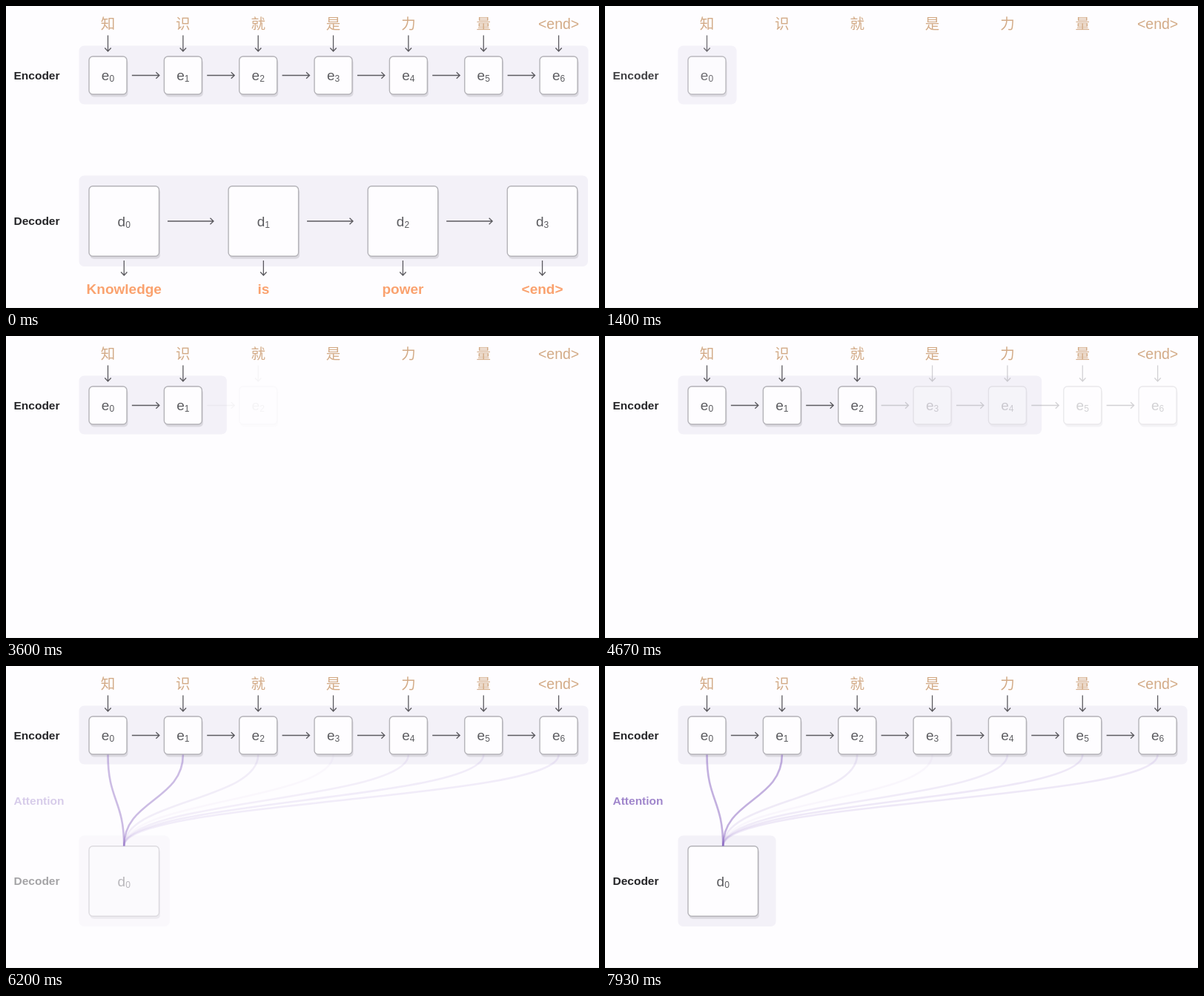
Recreate the animation shown at these times as an HTML page. Size 800 px wide and 407 px high, loop 8 s.

```html
<!DOCTYPE html>
<html lang="zh-CN">
<head>
<meta charset="utf-8">
<title>Encoder and decoder</title>
<style>
html, body { margin: 0; height: 100%; overflow: hidden; background: #fefdff; }
svg { display: block; width: 800px; height: 407px; }
text { font-family: "Liberation Sans", Arial, sans-serif; }
.input { font: 19.5px "Liberation Sans", "Noto Sans CJK SC", "Noto Sans CJK", sans-serif; fill: #d3ab87; text-anchor: middle; }
.output { font-size: 19px; font-weight: bold; fill: #faa26f; text-anchor: middle; }
.label { font-size: 15.5px; font-weight: bold; fill: #242427; }
.name { font-size: 19px; fill: #5c5c60; text-anchor: middle; }
.sub { font-size: 12px; }
.panel { fill: #f3f1f8; }
.shadow { fill: #dbd9e0; }
.box { fill: #fefdff; stroke: #b4b3b8; stroke-width: 1.4; }
.arrow { fill: none; stroke: #5c5b60; stroke-width: 1.3; }
.link { fill: none; stroke: #7b52b9; stroke-width: 2.6; }
</style>
</head>
<body>
<svg viewBox="0 0 800 407"></svg>
<script>
const svg = document.querySelector('svg');
const LOOP = 8000, STEP = 1000 / 15;
const INPUTS = ['知', '识', '就', '是', '力', '量', '<end>'];
const OUTPUTS = ['Knowledge', 'is', 'power', '<end>'];
const WEIGHTS = [.45, .45, .11, .04, .1, .12, .12];
const LEFT = 98.5;
const encX = i => 137.5 + 101.35 * i;
const decX = i => 159.25 + 188.1 * i;

function add(parent, tag, attrs, content = '') {
  const el = document.createElementNS('http://www.w3.org/2000/svg', tag);
  for (const key in attrs) el.setAttribute(key, attrs[key]);
  el.textContent = content;
  return parent.appendChild(el);
}
const group = () => add(svg, 'g', {});
const text = (parent, cls, x, y, content) => add(parent, 'text', { class: cls, x, y }, content);
const panel = (y, height) => add(svg, 'rect', { class: 'panel', x: LEFT, y, height, rx: 7 });

function label(y, content, fill) {
  const el = text(group(), 'label', 10.5, y, content);
  if (fill) el.style.fill = fill;
  return el;
}

function rightArrow(parent, x, y, length) {
  add(parent, 'path', { class: 'arrow', d: `M${x} ${y}h${length}m-4.5 -4.2l4.5 4.2l-4.5 4.2` });
}

function downArrow(parent, x, y, length) {
  add(parent, 'path', { class: 'arrow', d: `M${x} ${y}v${length}m-4.2 -4.5l4.2 4.5l4.2 -4.5` });
}

function cell(parent, x, y, size, letter, index) {
  const rect = { x: x - size / 2, y: y - size / 2, width: size, height: size, rx: 5 };
  add(parent, 'rect', { ...rect, class: 'shadow', x: rect.x + 1.5, y: rect.y + 3.5 });
  add(parent, 'rect', { ...rect, class: 'box' });
  const name = text(parent, 'name', x, y + 6.7, letter);
  add(name, 'tspan', { class: 'sub', dy: 1.8 }, index);
}

add(svg, 'rect', { y: 406, width: 800, height: 1, fill: '#f5f4f6' });
INPUTS.forEach((word, i) => text(svg, 'input', encX(i), i < 6 ? 31 : 30.5, word));

const encPanel = panel(53.5, 79), decPanel = panel(228.5, 122.5);
const encLabel = label(98.7, 'Encoder');
const decLabel = label(295.4, 'Decoder');
const attLabel = label(186.7, 'Attention', '#a086cc');

const encCells = INPUTS.map((_, i) => {
  const g = group(), x = encX(i);
  downArrow(g, x, 39.5, 21.5);
  if (i) rightArrow(g, x - 69, 93.5, 37);
  cell(g, x, 93.5, 51, 'e', i);
  return g;
});

const decCells = OUTPUTS.map((_, i) => {
  const g = group(), x = decX(i);
  if (i) rightArrow(g, x - 129.4, 290, 62);
  cell(g, x, 290, 94.5, 'd', i);
  return g;
});

const results = group();
OUTPUTS.forEach((word, i) => {
  downArrow(results, decX(i), 343, 20);
  text(results, 'output', decX(i), 388, word);
});

const links = group();
WEIGHTS.forEach((opacity, i) => add(links, 'path', {
  class: 'link', opacity,
  d: `M${encX(i)} 119.5C${encX(i)} 181 159.2 181 159.2 242.5`
}));

// cubic-bezier(.25, .1, .25, 1) run from start over length
function ease(t, start, length) {
  const p = (t - start) / length;
  if (p <= 0) return 0;
  if (p >= 1) return 1;
  const curve = (s, a, b) => 3 * (1 - s) * (1 - s) * s * a + 3 * (1 - s) * s * s * b + s ** 3;
  let low = 0, high = 1;
  for (let i = 0; i < 24; i++) {
    const mid = (low + high) / 2;
    if (curve(mid, .25, .25) < p) low = mid; else high = mid;
  }
  return curve(low, .1, 1);
}

const show = (el, opacity) => el.setAttribute('opacity', opacity);
const widen = (el, right) => el.setAttribute('width', right - LEFT);

function draw(time) {
  const t = Math.floor((time % LOOP + 5) / STEP) * STEP;
  const ending = t < 900;
  const out = 1 - ease(t, 0, 667);
  const first = Math.max(out, ease(t, 933, 800));
  const decoder = Math.max(out, ease(t, 6000, 800));

  [encPanel, encLabel, encCells[0]].forEach(el => show(el, first));
  encCells.slice(1).forEach((el, i) =>
    show(el, Math.max(out, ease(t, 2563 + 1000 * Math.min(i, 2), 560))));
  const grow = start => ease(t, start, 444);
  const reach = grow(2533) + grow(3533) + 4 * grow(4533);
  widen(encPanel, encX(ending ? 6 : reach) + 40);

  [decPanel, decLabel, decCells[0]].forEach(el => show(el, decoder));
  [...decCells.slice(1), results].forEach(el => show(el, out));
  widen(decPanel, decX(ending ? 3 : grow(7903)) + 61.5);

  show(attLabel, ease(t, 6000, 800));
  show(links, ease(t, 5667, 1000));
}

const begin = performance.now();
function frame() {
  draw(performance.now() - begin);
  requestAnimationFrame(frame);
}
frame();
</script>
</body>
</html>
```
